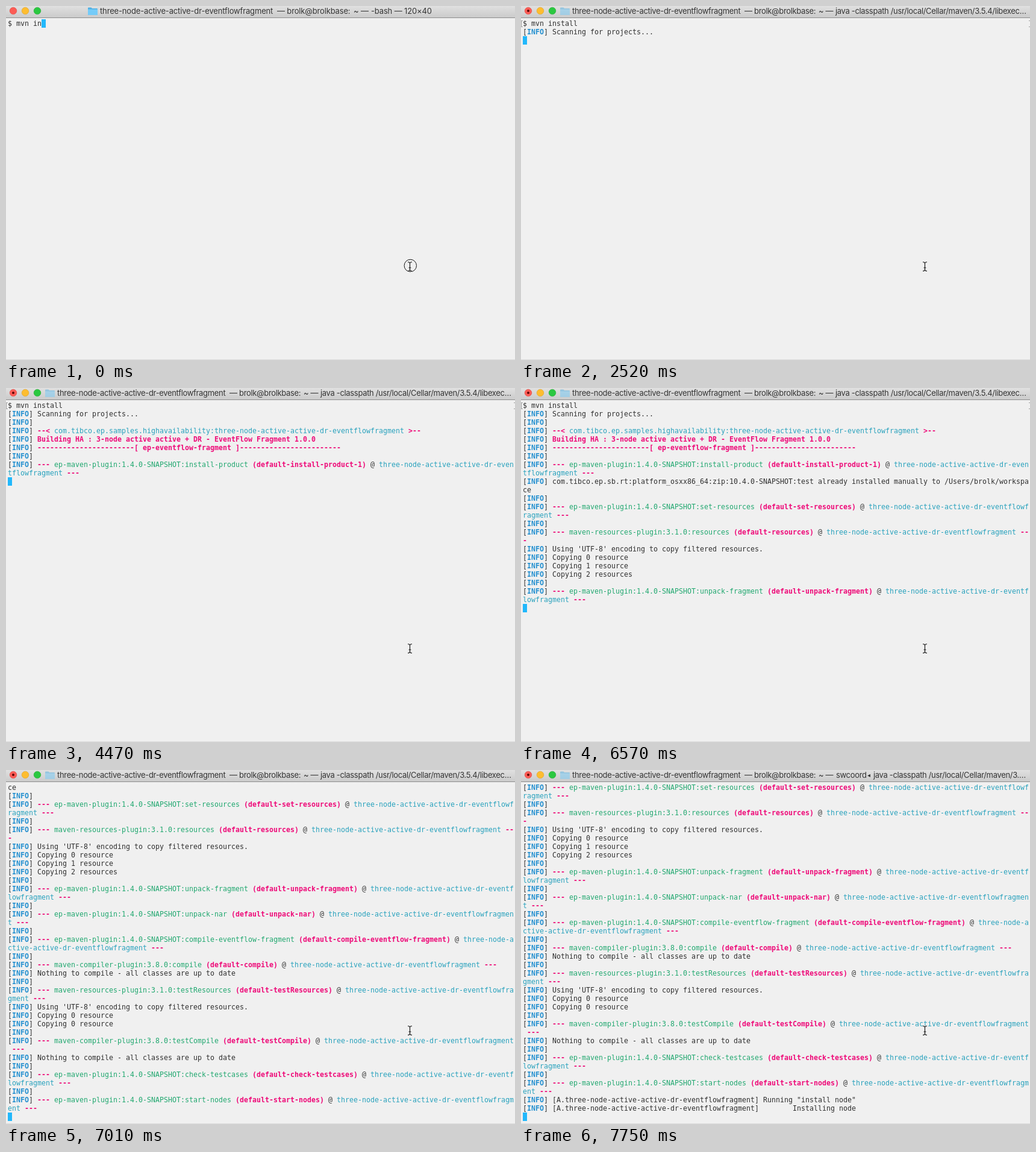
An HTML page that plays this animation: 845 px wide and 587 px high, repeating every 8000 ms.

```html
<!DOCTYPE html>
<html lang="en">
<head>
<meta charset="utf-8">
<title>Terminal build</title>
<style>
html, body { margin: 0; width: 100%; height: 100%; overflow: hidden; background: #f0f0f0; }
#stage { position: relative; width: 845px; height: 587px; overflow: hidden; background: #f0f0f0; }
#stage > * { position: absolute; }
#bar {
  left: 0; top: 0; width: 845px; height: 19px;
  background: linear-gradient(#e0e0e0, #cbcbcb); border-bottom: 1px solid #8e8e8e;
}
#title span {
  position: absolute; top: 0; white-space: pre; color: #353535;
  font: 13px/17px Inter, "Open Sans", sans-serif; letter-spacing: -.155px;
}
#title.busy span { letter-spacing: -.33px; }
#screen, #caret { left: 3px; top: 22px; }
#screen {
  white-space: pre; color: #303030; letter-spacing: calc(7px - 1ch);
  font: 11.6px/14px "DejaVu Sans Mono", "Liberation Mono", monospace;
  font-variant-ligatures: none;
}
#screen div { height: 14px; }
.info, .mark { font-weight: bold; }
.info { color: #2490d0; }
.mark { color: #ee0a78; }
.goal { color: #22a870; }
.name { color: #2aa2bd; }
#caret { width: 7px; height: 14px; background: #22b8fb; }
.edge { top: 24px; width: 2px; height: 9px; border: 1px solid #a2a2a2; }
#edgeL { left: 0; border-right: 0; }
#edgeR { left: 843px; border-left: 0; }
#base { left: 0; top: 586px; width: 845px; height: 1px; background: #dadada; }
svg { left: 0; top: 0; }
</style>
</head>
<body>
<div id="stage">
  <div id="bar"></div>
  <svg width="845" height="20">
    <g stroke-width=".6">
      <circle cx="12" cy="8" r="5.8" fill="#fc5c55" stroke="#df4540"/>
      <circle cx="32" cy="8" r="5.8" fill="#fdbd30" stroke="#dea023"/>
      <circle cx="52" cy="8" r="5.8" fill="#2bc840" stroke="#1faa2f"/>
    </g>
    <circle id="dot" cx="12" cy="8" r="2" fill="#5a0404"/>
    <g id="folder">
      <path d="M0 3.5q0-1 1-1h4.5l1.5 1.5h8q1 0 1 1v9q0 1-1 1H1q-1 0-1-1z" fill="#4fb0e4"/>
      <path d="M0 5.5h16v8.5q0 1-1 1H1q-1 0-1-1z" fill="#75cbf8"/>
    </g>
  </svg>
  <div id="title"></div>
  <div id="screen"></div>
  <div id="caret"></div>
  <div id="edgeL" class="edge"></div>
  <div id="edgeR" class="edge"></div>
  <div id="base"></div>
  <svg width="845" height="587" fill="none">
    <circle id="ring" cx="671.3" cy="430.5" r="10.2" stroke="#111"/>
    <path id="halo" stroke="#fff" stroke-width="2.6" stroke-opacity=".75"/>
    <path id="beam" stroke="#111" stroke-width="1.2"/>
  </svg>
</div>
<script>
const LOOP = 8000, COLS = 120, ROWS = 40, CELL_W = 7, CELL_H = 14;
const PROJECT = 'three-node-active-active-dr-eventflowfragment';
const USER = 'brolk', HOST = 'brolkbase';
const byId = id => document.getElementById(id);

// Each logical line is a list of [class, text] parts.
const info = (...parts) => [['', '['], ['info', 'INFO'], ['', '] '], ...parts];
const plain = text => info(['', text]);
const mark = text => info(['mark', text]);
const blank = info();
const step = (plugin, goal, run = goal) => info(
  ['mark', '--- '], ['goal', `${plugin}:${goal}`], ['mark', ` (default-${run})`],
  ['', ' @ '], ['name', PROJECT], ['mark', ' ---']);
const EP = 'ep-maven-plugin:1.4.0-SNAPSHOT';
const RESOURCES = 'maven-resources-plugin:3.1.0';
const COMPILER = 'maven-compiler-plugin:3.8.0';
const encoding = plain("Using 'UTF-8' encoding to copy filtered resources.");
const upToDate = plain('Nothing to compile - all classes are up to date');
const node = text => plain(`[A.${PROJECT}] ${text}`);

const log = [
  plain('Scanning for projects...'),
  blank,
  info(['mark', '--< '], ['name', `com.tibco.ep.samples.highavailability:${PROJECT}`], ['mark', ' >--']),
  mark('Building HA : 3-node active active + DR - EventFlow Fragment 1.0.0'),
  mark('-'.repeat(23) + '[ ep-eventflow-fragment ]' + '-'.repeat(24)),
  blank, step(EP, 'install-product', 'install-product-1'),
  plain(`com.tibco.ep.sb.rt:platform_osxx86_64:zip:10.4.0-SNAPSHOT:test already installed manually to /Users/${USER}/workspace`),
  blank, step(EP, 'set-resources'),
  blank, step(RESOURCES, 'resources'),
  encoding, plain('Copying 0 resource'), plain('Copying 1 resource'), plain('Copying 2 resources'),
  blank, step(EP, 'unpack-fragment'),
  blank, step(EP, 'unpack-nar'),
  blank, step(EP, 'compile-eventflow-fragment'),
  blank, step(COMPILER, 'compile'), upToDate,
  blank, step(RESOURCES, 'testResources'),
  encoding, plain('Copying 0 resource'), plain('Copying 0 resource'),
  blank, step(COMPILER, 'testCompile'), upToDate,
  blank, step(EP, 'check-testcases'),
  blank, step(EP, 'start-nodes'),
  node('Running "install node"'),
  node('       Installing node')
];

function wrap(parts) {
  const rows = [[]];
  let room = COLS;
  for (let [style, text] of parts) {
    while (text) {
      if (!room) { rows.push([]); room = COLS; }
      const piece = text.slice(0, room);
      rows.at(-1).push([style, piece]);
      room -= piece.length;
      text = text.slice(piece.length);
    }
  }
  return rows;
}
const output = log.flatMap(wrap);

// Steps: [start ms, value]
const typed = [[0, 'in'], [150, 'ins'], [290, 'inst'], [440, 'insta'], [730, 'instal'], [880, 'install']];
const printed = [[0, 0], [1320, 1], [2520, 2], [4020, 6], [4470, 9], [6570, 24], [6710, 32], [7010, 49], [7300, 51]];
const java = '-classpath /usr/local/Cellar/maven/3.';
const busyTitle = (...tail) => [[85, PROJECT], [371, `— ${USER}@${HOST}:`], [494, '~ —'], ...tail];
const titles = [
  [0, [[156, PROJECT], [450, `— ${USER}@${HOST}:`], [577, '~ —'], [606, '-bash —'], [661, '120×40']]],
  [1470, busyTitle([522, `java ${java}5.4/libexec…`])],
  [7450, busyTitle([523, 'sh'], [540, '◂'], [550, `java ${java}5.4/li…`])],
  [7750, busyTitle([523, 'swcoord'], [575, '◂'], [585, `java ${java}…`])]
];
const at = (steps, t) => steps.findLast(([start]) => start <= t)[1];

function make(tag, text, className = '') {
  const el = document.createElement(tag);
  el.textContent = text;
  el.className = className;
  return el;
}

function drawTitle(parts, busy) {
  byId('title').className = busy ? 'busy' : '';
  byId('title').replaceChildren(...parts.map(([x, text]) => {
    const span = make('span', text);
    span.style.left = x + 'px';
    if (text === '◂') span.style.fontSize = '10px';
    return span;
  }));
  byId('dot').style.display = busy ? '' : 'none';
  byId('folder').setAttribute('transform', `translate(${busy ? 65 : 136} 0)`);
  byId('folder').style.opacity = busy ? .5 : 1;
}

function drawScreen(command, count) {
  const rows = [[['', '$ mvn ' + command]], ...output].slice(0, Math.max(1, count));
  const scroll = Math.max(0, count - ROWS + 1);
  byId('screen').replaceChildren(...rows.slice(scroll).map(parts => {
    const row = make('div', '');
    row.append(...parts.map(([style, text]) => make('span', text, style)));
    return row;
  }));
  const col = count ? 0 : 6 + command.length;
  byId('caret').style.transform = `translate(${col * CELL_W}px, ${(count - scroll) * CELL_H}px)`;
  for (const id of ['edgeL', 'edgeR']) byId(id).style.display = count && !scroll ? '' : 'none';
}

const beam = 'M667 424.5q3.5 0 3.5 2.5q0-2.5 3.5-2.5M667 439.5q3.5 0 3.5-2.5q0 2.5 3.5 2.5M670.5 426v12M668.5 434h4';
byId('halo').setAttribute('d', beam);
byId('beam').setAttribute('d', beam);

const origin = performance.now();
let shown = '';
function tick() {
  const t = (performance.now() - origin) % LOOP;
  const title = at(titles, t), command = at(typed, t), count = at(printed, t);
  const key = [titles.findIndex(entry => entry[1] === title), command, count].join();
  if (key !== shown) {
    shown = key;
    drawTitle(title, t >= 1470);
    drawScreen(command, count);
    byId('ring').style.display = t < 150 ? '' : 'none';
  }
  requestAnimationFrame(tick);
}
tick();
</script>
</body>
</html>
```
